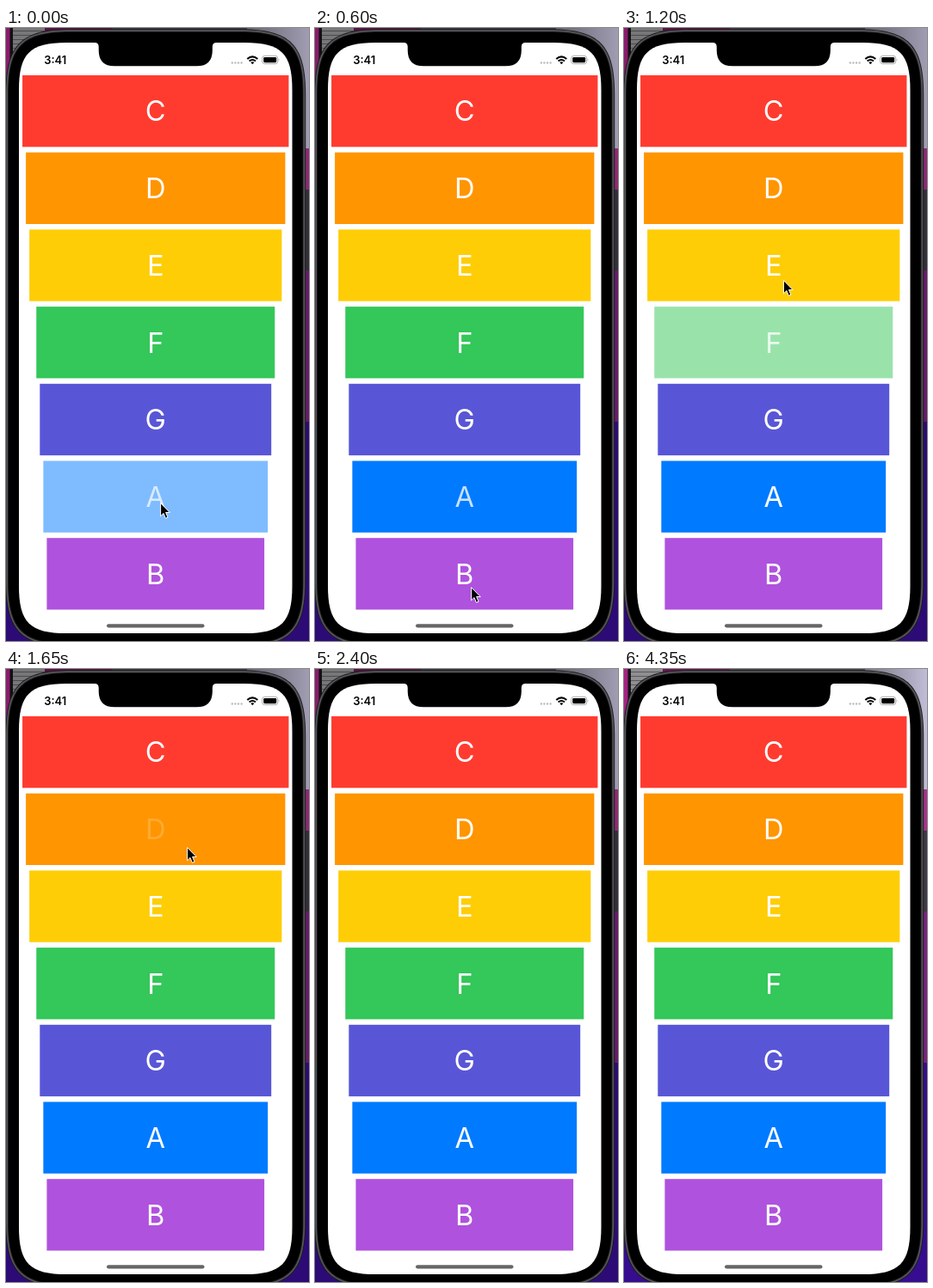
Write an HTML page that moves like this. It is 352 by 713 pixels and loops after 4500 ms.

```html
<!DOCTYPE html>
<html lang="en">
<head>
<meta charset="utf-8">
<title>Xylophone keys</title>
<style>
  html, body { margin: 0; width: 100%; height: 100%; overflow: hidden; background: #000; }
  svg { display: block; width: 352px; height: 713px; }
  text { font-family: Inter, Roboto, "Liberation Sans", sans-serif; }
  .note { font-size: 32.6px; fill: #fff; text-anchor: middle; }
  .clock { font-size: 12.9px; font-weight: 600; }
</style>
</head>
<body>
<svg viewBox="0 0 352 713" xmlns="http://www.w3.org/2000/svg">
  <defs>
    <linearGradient id="corner">
      <stop offset="0" stop-color="#66646e"/>
      <stop offset="1" stop-color="#a09db3"/>
    </linearGradient>
    <pattern id="slats" width="40" height="5" patternUnits="userSpaceOnUse">
      <rect width="40" height="5" fill="#77777a"/>
      <rect y="3" width="40" height="1" fill="#4b4b4e"/>
    </pattern>
  </defs>

  <g id="desk">
    <rect width="352" height="713" fill="#2d0b76"/>
    <rect x="176" width="176" height="458" fill="#661c68"/>
    <rect x="176" width="176" height="282" fill="#34303a"/>
    <rect x="176" width="176" height="188" fill="#8d2a72"/>
    <rect x="280" width="72" height="140" fill="url(#corner)"/>
    <rect width="46" height="60" fill="url(#slats)"/>
    <rect width="8" height="60" fill="#111"/>
    <rect width="4.5" height="60" fill="#8a1c6c"/>
    <rect x="45" width="78" height="4" fill="#551342"/>
    <rect x="123" width="157" height="4" fill="#3b3940"/>
  </g>
  <g id="body"></g>
  <path d="M103 16V17Q107.700 17 107.700 22V26Q107.700 44.300 126 44.300H221.500Q239.800 44.300 239.800 26V22Q239.800 17 244.500 17V16Z"/>

  <text class="clock" x="44.300" y="42">3:41</text>
  <path d="M262.800 40.500H275" stroke="#bdbdbd" stroke-width="2.500" stroke-linecap="round" stroke-dasharray="0 3.600"/>
  <g fill="none" stroke="#000" stroke-width="2">
    <path d="M280.300 36.100Q286.300 30.600 292.300 36.100"/>
    <path d="M282.600 38.600Q286.300 35.400 290 38.600"/>
  </g>
  <path d="M284.300 40.100Q286.300 38.600 288.300 40.100L286.300 42.200Z"/>
  <rect x="297.700" y="32.400" width="18" height="9.300" rx="2.700" fill="none" stroke="#a6a6a6" stroke-width=".9"/>
  <rect x="299.200" y="33.900" width="15" height="6.300" rx="1.400"/>
  <path d="M316.700 35.500Q318.400 37 316.700 38.500Z" fill="#a6a6a6"/>

  <g id="keys"></g>
  <rect x="117" y="693.200" width="113.500" height="4.200" rx="2.100" fill="#666"/>
  <path id="cursor" d="M.6 .6V15.800L4 12.500L6.400 18.300L9 17.200L6.600 11.500H11.200Z"
        fill="#000" stroke="#fff" stroke-linejoin="round"/>
</svg>
<script>
const STEP = 150, LOOP = 4500, MID = 173.75;
const svg = document.querySelector("svg");
const byId = id => document.getElementById(id);

function add(parent, tag, attrs) {
  const el = document.createElementNS(svg.namespaceURI, tag);
  for (const k in attrs) el.setAttribute(k, attrs[k]);
  return parent.appendChild(el);
}

// Rounded box with continuous corners, centred on the phone's axis
function shell(gap, fill) {
  const l = 15 - gap, t = 17 - gap, r = 2 * MID - l, b = 704 + gap;
  const e = 1.39 * (39.6 + gap), c = e * 0.23;
  add(byId("body"), "path", { fill, d:
    `M${l} ${t + e}C${l} ${t + c} ${l + c} ${t} ${l + e} ${t}
     H${r - e}C${r - c} ${t} ${r} ${t + c} ${r} ${t + e}
     V${b - e}C${r} ${b - c} ${r - c} ${b} ${r - e} ${b}
     H${l + e}C${l + c} ${b} ${l} ${b - c} ${l} ${b - e}Z` });
}
shell(15.7, "#1b1b1d");
shell(14.7, "#57575b");
shell(13, "#1b1b1d");
shell(12, "#000");
shell(0, "#fff");

const colors = ["#ff3b30", "#ff9500", "#fecd06", "#34c759", "#5856d6", "#007aff", "#af52de"];
const keys = colors.map((fill, i) => {
  const x = 15 + 4.05 * (i + (i > 2 ? 2 : 1)), y = 55 + 89.7 * i;
  const box = add(byId("keys"), "rect", { x, y, width: 2 * (MID - x), height: 83.3, fill });
  const label = add(byId("keys"), "text", { class: "note", x: MID, y: y + 53.4 });
  label.textContent = "CDEFGAB"[i];
  return { note: label.textContent, box, label };
});

// note, touch time, hold time
const presses = [
  ["A", -250, 400], ["A", 310, 290], ["B", 650, 400],
  ["F", 900, 400], ["E", 1260, 390], ["D", 1650, 400]
];

// pointer passes as [step, x, y]
const passes = [
  [[0, 179, 552], [3, 180, 588], [4, 181, 650], [5, 183, 444], [9, 185, 283],
   [10, 203, 235], [11, 210, 207], [13, 210, 207], [14, 178, 49], [15, 158, -4]],
  [[24, 171, 164], [25, 178, 621], [26, 180, 676], [27, 196, 681], [28, 250, 705]]
];

const easeOut = p => 1 - (1 - p) ** 2;

function pointer(n) {
  const pass = passes.find(p => n >= p[0][0] && n <= p[p.length - 1][0]);
  if (!pass) return null;
  const i = Math.max(1, pass.findIndex(p => p[0] >= n));
  const [s, x, y] = pass[i - 1], [e, u, v] = pass[i];
  const k = easeOut((n - s) / (e - s));
  return [x + (u - x) * k, y + (v - y) * k];
}

function draw(time) {
  const n = Math.floor(time / STEP), t = n * STEP;
  for (const { note, box, label } of keys) {
    const press = presses.filter(p => p[0] === note && p[1] <= t).pop();
    const age = press ? t - press[1] : Infinity;
    box.setAttribute("opacity", press && age > 80 && age < press[2] ? 0.5 : 1);
    label.setAttribute("opacity", Math.min(1, 0.2 + age / 500));
  }
  const tip = pointer(n);
  byId("cursor").style.display = tip ? "" : "none";
  if (tip) byId("cursor").setAttribute("transform", `translate(${tip})`);
  byId("desk").style.filter = t >= 3450 ? "brightness(1.2)" : "none";
}

const start = performance.now();
function tick(now) {
  draw(Math.max(0, now - start) % LOOP);
  requestAnimationFrame(tick);
}
draw(0);
requestAnimationFrame(tick);
</script>
</body>
</html>
```
